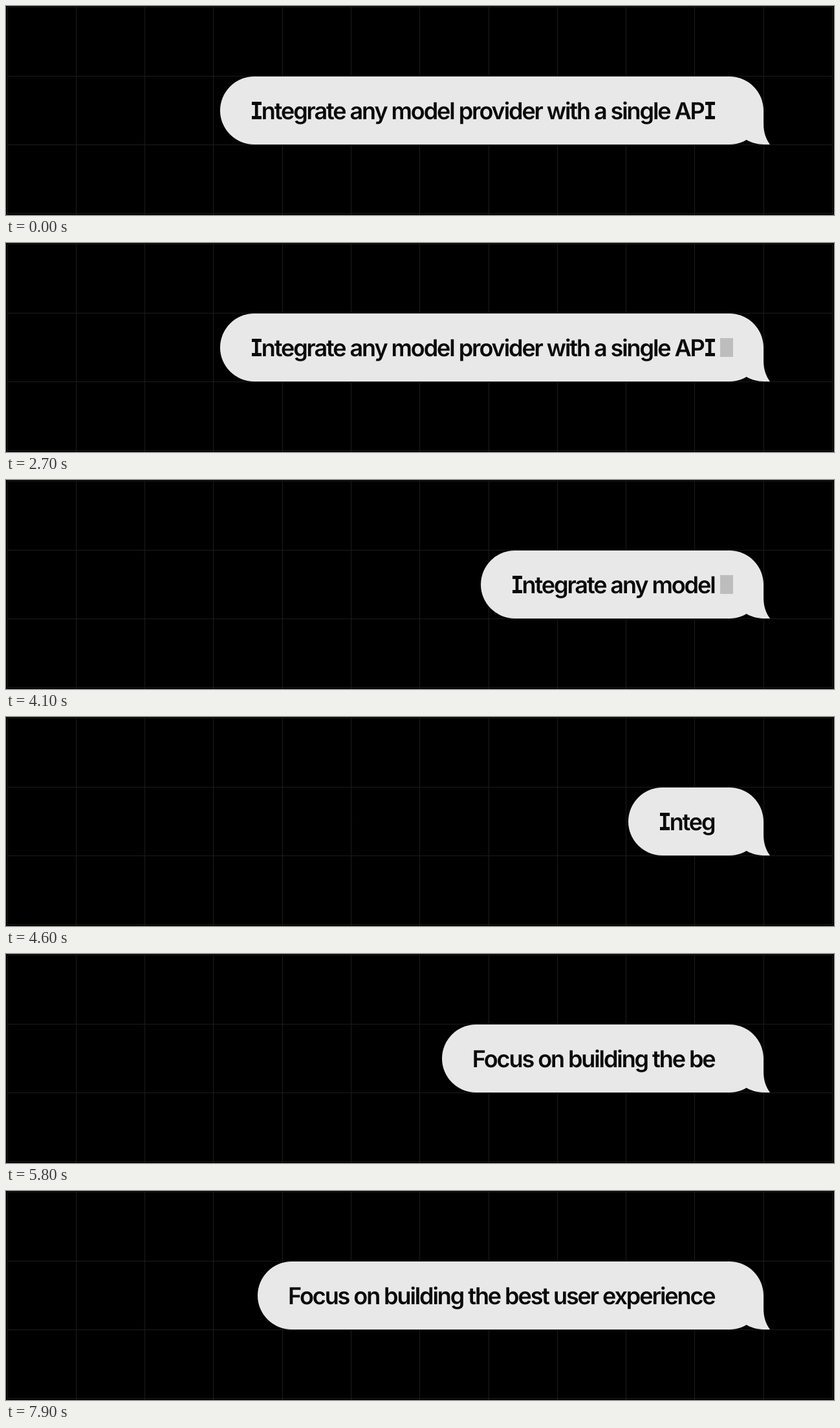
Write an HTML page that moves like this. It is 1280 px wide and 323 px high and loops after 8 s.

```html
<!DOCTYPE html>
<html lang="en">
<head>
<meta charset="utf-8">
<title>Chat bubble</title>
<style>
  html, body { margin: 0; width: 100%; height: 100%; overflow: hidden; background: #000; }
  #stage { position: relative; width: 1280px; height: 323px; overflow: hidden; background: #000; }
  svg { position: absolute; left: 0; top: 0; }
  #bubble {
    position: absolute; right: 109px; top: 109px; height: 105px;
    padding: 0 75.5px 0 47px; border-radius: 52.5px; background: #e8e8e8;
    display: flex; align-items: center;
  }
  #text {
    font: 600 36px/1 Inter, sans-serif; color: #0a0a0a; white-space: pre;
    text-rendering: geometricPrecision;
  }
  /* Capital I with slab serifs */
  .slab {
    display: inline-block; position: relative; width: 15px; padding-left: 1.8px;
    text-align: center; letter-spacing: 0;
  }
  .slab::before, .slab::after {
    content: ""; position: absolute; left: 1.8px; width: 15px; height: 4.4px; background: #0a0a0a;
  }
  .slab::before { top: .136em; }
  .slab::after { bottom: .136em; }
  #cursor { position: absolute; left: 1104px; top: 147px; width: 19.5px; height: 29px; background: #bdbdbd; }
</style>
</head>
<body>
<div id="stage">
  <svg width="1280" height="323">
    <g id="grid" fill="#1c1c1a" shape-rendering="crispEdges"></g>
    <path fill="#e8e8e8" d="M1118 161H1171V182C1171 195 1175 206 1181 214H1172C1161 214 1152 211 1145 207Z"/>
  </svg>
  <div id="bubble"><span id="text"></span></div>
  <div id="cursor"></div>
</div>
<script>
const LOOP = 8000, TICK = 100;
const FIRST = "Integrate any model provider with a single API";
const SECOND = "Focus on building the best user experience";
const BLINK = { period: 1100, on: 450, off: 1000 };
const SECOND_ADVANCE = 659.5;

const byId = id => document.getElementById(id);
const textEl = byId("text"), cursorEl = byId("cursor");

function drawGrid() {
  const cell = 106.28;
  let bars = "";
  const bar = (x, y, w, h) => bars += `<rect x="${x}" y="${y}" width="${w}" height="${h}"/>`;
  for (let i = 0; i <= 12; i++) bar(Math.floor(2.1 + i * cell), 1, 1, 322);
  for (let i = 0; i <= 3; i++) bar(2, Math.floor(1.8 + i * cell), 1276, 1);
  byId("grid").innerHTML = bars;
}

// One tracking value, shared by both sentences
function setTracking() {
  textEl.textContent = SECOND;
  const natural = textEl.getBoundingClientRect().width;
  textEl.style.letterSpacing = (SECOND_ADVANCE - natural) / SECOND.length + "px";
}

function textAt(t) {
  const deleting = t < 4850;
  const count = deleting ? 35.3 - (t - 3500) * 0.027 : 11.3 + (t - 5300) * 0.026;
  return (deleting ? FIRST : SECOND).slice(0, Math.max(0, Math.floor(count)));
}

function render(t) {
  textEl.innerHTML = textAt(t).replace(/I/g, '<span class="slab">I</span>');
  const phase = t % BLINK.period;
  cursorEl.style.visibility = phase >= BLINK.on && phase < BLINK.off ? "visible" : "hidden";
}

let shown = -1;
function frame() {
  const t = Math.floor(performance.now() % LOOP / TICK) * TICK;
  if (t !== shown) render(shown = t);
  requestAnimationFrame(frame);
}

drawGrid();
setTracking();
frame();
</script>
</body>
</html>
```
